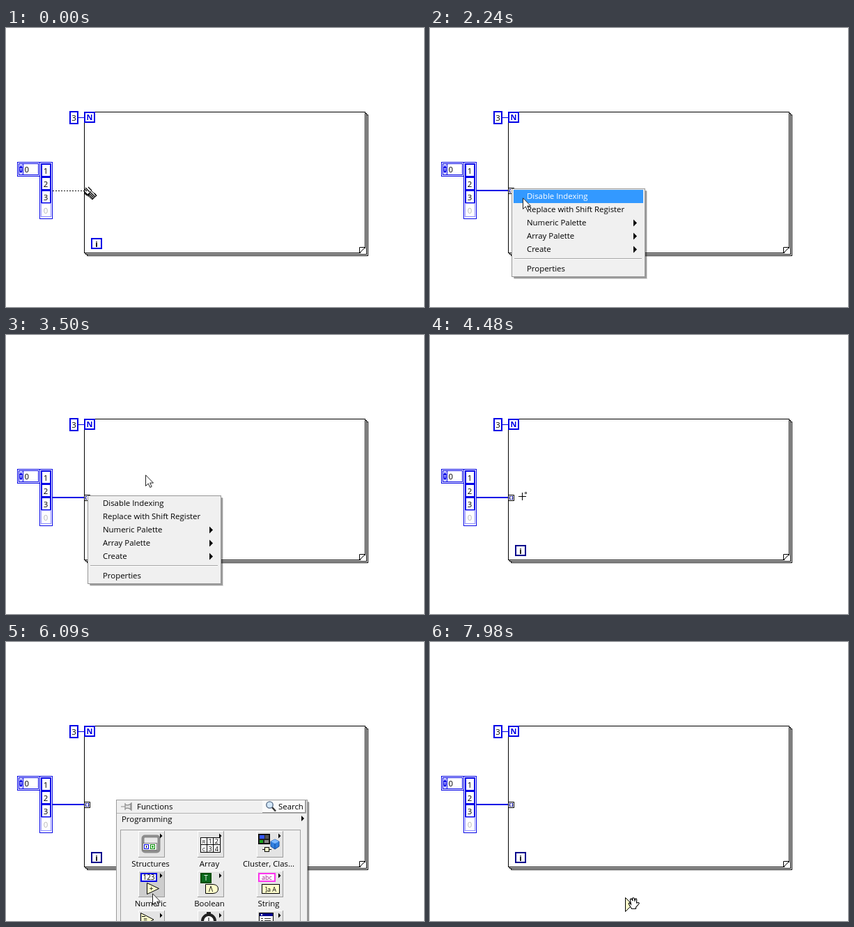
An HTML page that plays this animation: 600 by 400 pixels, repeating every 8000 ms.

```html
<!DOCTYPE html>
<html lang="en">
<head>
<meta charset="utf-8">
<title>Loop diagram</title>
<style>
  html, body { margin: 0; width: 100%; height: 100%; overflow: hidden; background: #fff; }
  svg { display: block; width: 600px; height: 400px; }
  text { font: 11.4px "Open Sans", "Noto Sans", sans-serif; white-space: pre; }
  .mid { text-anchor: middle; }
  .bold { font-weight: 700; }
  .crisp { shape-rendering: crispEdges; }
</style>
</head>
<body>
<svg id="stage" viewBox="0 0 600 400"></svg>
<script>
const LOOP = 8000, STEP = 70;
const BLUE = '#0000e6', NAVY = '#00008c', CREAM = '#ffffcc', FACE = '#f0f0f0';

// Markup helpers
const rect = (x, y, w, h, fill, more = '') =>
  `<rect class="crisp" x="${x}" y="${y}" width="${w}" height="${h}" fill="${fill}" ${more}/>`;
const box = (x, y, w, h, line, fill = 'none', lw = 1) =>
  rect(x + lw / 2, y + lw / 2, w - lw, h - lw, fill, `stroke="${line}" stroke-width="${lw}"`);
const path = (d, line = '#000', fill = 'none', lw = 1, more = '') =>
  `<path d="${d}" stroke="${line}" fill="${fill}" stroke-width="${lw}" ${more}/>`;
const crisp = (d, line, fill, lw) => path(d, line, fill, lw, 'class="crisp"');
const label = (x, y, s, more = '') => `<text x="${x}" y="${y}" ${more}>${s}</text>`;
const tiny = (x, y, s, size = 9, fill = '#000') =>
  `<text class="mid" x="${x}" y="${y}" fill="${fill}" style="font-size:${size}px">${s}</text>`;
const group = (id, body) => `<g id="${id}">${body}</g>`;
const triRight = (x, y, s) => path(`M${x} ${y - s}L${x + s} ${y}L${x} ${y + s}Z`, 'none', '#000');

function loopFrame() {
  return box(112, 120, 404, 203, '#000', '#fff')
    + crisp('M516 122.5H517.5V324.5H114.5V323M518 124.5H519.5V326.5H116.5V325')
    + path('M508 323.5H516.5V315Z', 'none', '#fff')
    + path('M507.5 322.5V314.5H515.5Z', '#000', '#fff')
    + box(91, 119, 13, 19, BLUE, '#fff', 2)
    + label(97.5, 133, '3', 'class="mid"')
    + rect(104, 128, 8, 1, BLUE)
    + box(112, 120, 16, 16, BLUE, '#fff', 2)
    + `<text class="mid bold" x="120" y="132" fill="${BLUE}" style="font-size:11px">N</text>`
    + rect(123, 302, 14, 14, '#fff', `id="count" stroke="${BLUE}" stroke-width="2"`)
    + label(130, 314, 'i', 'class="mid bold"');
}

function arrayConstant() {
  let s = box(16, 192, 33, 21, BLUE, '#fff') + box(18, 194, 29, 17, BLUE)
    + rect(19, 195, 6, 15, '#d8d8ff') + box(24, 194, 23, 17, BLUE, '#fff')
    + path('M19 201L21.5 196.500L24 201ZM19 204H24L21.5 208.500Z', 'none', BLUE)
    + rect(19, 202, 5, 1, BLUE)
    + label(26.5, 207, '0')
    + box(48, 192, 19, 82, BLUE, '#fff');
  ['1', '2', '3', '0'].forEach((n, i) => {
    const y = 195 + i * 19, off = i === 3;
    s += box(50, y - 1, 15, 20, off ? '#8c8cff' : BLUE, '#fff', off ? 1 : 2)
      + label(57, y + 14, n, `class="mid" fill="${off ? '#b8b8b8' : '#000'}"`);
  });
  return s;
}

const wires = () =>
  group('draft', path('M67 233.5H114', '#000', 'none', 1, 'class="crisp" stroke-dasharray="2 2"'))
  + group('wire', rect(67, 232, 45, 2, BLUE) + box(112, 229, 9, 9, '#000', '#fff')
    + crisp('M116 231.5H114.5V235.5H116M117 231.5H118.5V235.5H117', NAVY));

function contextMenu() {
  const items = ['Disable Indexing', 'Replace with Shift Register', 'Numeric Palette', 'Array Palette', 'Create'];
  return rect(121, 234, 191, 126, '#000', 'opacity=".13"')
    + rect(120, 233, 191, 126, '#000', 'opacity=".3"')
    + box(117, 230, 192, 127, '#979797', FACE)
    + rect(120, 232, 186, 19, '#3399ff', 'id="pick"')
    + items.map((s, i) => label(139, 245 + i * 19, s, i ? '' : 'id="first"')
      + (i > 1 ? triRight(292, 241.5 + i * 19, 5) : '')).join('')
    + rect(121, 330, 183, 1, '#a6a6a6') + rect(121, 331, 183, 1, '#fff')
    + label(139, 349, 'Properties');
}

// Palette parts
const pin = (x, y) =>
  path(`M${x} ${y + 6}H${x + 6}M${x + 6} ${y + 1}V${y + 11}M${x + 6} ${y + 3}Q${x + 10} ${y + 5} ${x + 14} ${y + 2}V${y + 10}Q${x + 10} ${y + 7} ${x + 6} ${y + 9}M${x + 15} ${y}V${y + 12}`,
    '#8a8a8a', '#e2e2e2', 1.2);

const tile = (x, y, art, id = '') =>
  rect(x, y, 38, 38, '#e4e4e4', id && `id="${id}"`)
  + crisp(`M${x + .5} ${y + 38}V${y + .5}H${x + 38}`, '#fff')
  + crisp(`M${x} ${y + 37.5}H${x + 37.5}V${y}`, '#9a9a9a')
  + `<g transform="translate(${x} ${y})">${art}</g>`;

const node = (x, y, w, h, sign) =>
  path(`M${x} ${y}L${x + w} ${y + h / 2}L${x} ${y + h}Z`, '#000', CREAM)
  + tiny(x + w * .36, y + h / 2 + 3.5, sign, 10);

const art = {
  structures: `<rect x="6.500" y="7.500" width="23" height="22" rx="3" fill="#e8e8e8" stroke="#8c8c8c" stroke-width="4"/>`
    + box(6, 17, 21, 11, '#777', '#fff') + box(8, 19, 7, 7, BLUE, '#fff') + rect(11, 21, 1, 3, '#000')
    + box(17, 19, 7, 7, '#008000', '#fff') + `<circle cx="20.500" cy="22.500" r="1.500" fill="#0a0"/>`,
  array: box(4, 9, 29, 22, '#000', '#fff') + crisp('M13.5 9V31M22.5 9V31M4 19.5H33')
    + ['R', '1', '2', 'C', '3', '4'].map((c, i) =>
      tiny(9 + i % 3 * 9.2, 18 + (i > 2) * 10.5, c, i % 3 ? 9 : 7)).join(''),
  cluster: box(2, 4, 17, 15, '#000', '#222') + rect(4, 6, 7, 5, '#3355ff') + rect(4, 13, 5, 4, '#19a319')
    + rect(12, 6, 5, 5, '#555') + rect(11, 13, 6, 4, '#888')
    + path('M20 15L26 12L32 15V22L26 26L20 22Z', '#124a9c', '#2f7fe0')
    + path('M20 15L26 18L32 15L26 12Z', 'none', '#7db8ff') + path('M26 18V26', '#124a9c')
    + path('M8 26.5H11M18 26.500H21', '#000') + box(11, 23, 7, 7, '#000', CREAM),
  numeric: box(3, 3, 24, 13, BLUE, '#fff', 2) + tiny(15, 13, '123', 10) + node(12.5, 17.5, 17, 16, '+'),
  boolean: box(4, 3, 16, 15, '#004d00', '#0a6b1e', 2) + tiny(12, 14, 'T', 10, '#fff')
    + path('M11.5 19.5H22Q29.500 20 29.500 26Q29.500 32 22 32.500H11.500Z', '#000', CREAM)
    + tiny(19, 30, 'Λ', 10),
  string: box(2, 3, 25, 13, '#ff33ee', '#fff', 2) + tiny(14.5, 12.5, 'abc', 9, '#a0148c')
    + box(7, 19, 26, 14, '#000', CREAM) + tiny(20, 30, ']a A', 9),
  compare: path('M3.5 3.500L22 13L3.500 23Z', '#000', CREAM) + tiny(10, 16, '=', 10)
    + crisp('M5 8.5H10', '#000'),
  timing: `<circle cx="16" cy="15" r="9" fill="#fff" stroke="#222" stroke-width="4"/>`
    + rect(13, 2, 6, 4, '#222') + path('M16 10V16L20 18'),
  dialog: box(3, 3, 21, 18, '#000', '#fff') + rect(4, 4, 19, 4, NAVY) + rect(6, 5, 2, 2, '#fff')
    + crisp('M6 11.5H9M11 11.5H20M6 14.5H9M11 14.5H20', '#333')
};

function functionsPalette() {
  const cells = [
    ['structures', 'Structures'], ['array', 'Array'], ['cluster', 'Cluster, Clas...'],
    ['numeric', 'Numeric'], ['boolean', 'Boolean'], ['string', 'String'],
    ['compare'], ['timing'], ['dialog']];
  let s = rect(162, 230, 274, 170, '#000', 'opacity=".1"') + rect(161, 229, 274, 171, '#000', 'opacity=".35"')
    + box(158, 226, 275, 180, '#9a9a9a', FACE) + rect(159, 245, 272, 1, '#b4b4b4')
    + pin(165, 230) + label(188, 240, 'Functions')
    + rect(368, 227, 63, 17, '#fafafa') + rect(368, 244, 63, 1, '#8f8f8f') + rect(429, 227, 2, 18, '#a0a0a0')
    + path('M382 237L387 242.5', '#333', 'none', 2.4)
    + `<circle cx="378.500" cy="233.500" r="4.700" fill="#d4e8fa" stroke="#4f6580" stroke-width="1.300"/>`
    + label(391, 240, 'Search')
    + label(166, 258, 'Programming') + triRight(424, 253, 4)
    + box(164, 269, 259, 140, '#a0a0a0', FACE);
  cells.forEach(([key, name], i) => {
    const col = i % 3, x = [190, 275, 360][col], y = 271 + 57 * Math.floor(i / 3);
    s += tile(x, y, art[key] + triRight(31, 7, 3.5), key === 'numeric' ? 'hot' : '');
    if (name) s += label([207.500, 292, 377][col], y + 51, name, 'class="mid"');
  });
  return s;
}

function numericPalette() {
  return box(246, 346, 526, 90, '#9a9a9a', FACE) + rect(247, 365, 524, 1, '#b4b4b4')
    + pin(253, 350) + label(276, 360, 'Numeric')
    + box(252, 369, 514, 80, '#a0a0a0', FACE)
    + ['+', '−', '×', '÷'].map((sign, i) =>
      tile(278 + 85 * i, 371, node(9.5, 7.5, 21, 23, sign), i ? '' : 'add')).join('');
}

function pointers() {
  const spool = path('M1 3L4 6M2 1L8 7M6 0L11 5M0 6L6 12M1 9L4 12', '#000', 'none', 1.2)
    + path('M4.5 11.500L10.500 5.500L18 12L12 18Z', '#000', '#fff')
    + path('M6 10.5L13 17M7.5 9L14.5 15.500M9 7.5L16 14M5 13L8 9M15 9L18 13', '#000', 'none', 1.3);
  const cross = rect(-5, 0, 11, 1, '#000') + rect(0, -5, 1, 11, '#000') + box(4, -6, 3, 3, '#555');
  const arrow = path('M.5 .8V16.500L4.2 13L6.800 18.500L9.200 17.400L6.700 12.100H11.500Z', '#222', '#fff');
  const hand = path('M7.5 4.5Q7 2 9 2L11 5L10.500 1.500Q12 0 13.200 1.500L14 5L15 2Q16.500 1.500 16.700 3.500L16.500 8L19 7.500Q21 8 19.800 9.500L15.500 14.500V16.500H9.500L5.500 10Q4.500 8 6.500 8L8.500 10Z',
    '#000', '#fff', 1.1);
  return group('spool', spool) + group('cross', cross) + group('arrow', arrow)
    + group('hand', group('carried', path('M.5 .5L10.500 10.500L.5 20.500Z', '#000', CREAM)) + hand);
}

const $ = id => document.getElementById(id);
$('stage').innerHTML = rect(0, 0, 600, 400, '#fff') + loopFrame() + arrayConstant() + wires()
  + group('menu', contextMenu()) + group('palette', functionsPalette())
  + group('sub', numericPalette()) + pointers();

// Pointer route: time, x, y
const route = [
  [0, 112, 228], [140, 112, 228], [210, 113, 229], [280, 121, 238], [490, 121, 238],
  [560, 113, 232], [700, 115, 231], [770, 115, 231], [910, 116, 231], [1120, 116, 231],
  [1190, 118, 232], [1610, 118, 232], [1960, 132, 244], [2170, 132, 244], [2240, 133, 243],
  [2380, 128, 238], [2520, 132, 237], [2940, 184, 250], [3010, 185, 249], [3080, 185, 247],
  [3290, 185, 247], [3500, 200, 200], [3990, 200, 200], [4480, 132, 231], [4620, 118, 239],
  [4830, 118, 239], [5040, 158, 228], [5320, 158, 228], [6090, 210, 360], [6860, 210, 360],
  [7140, 290, 372], [7770, 290, 372], [7840, 280, 366], [LOOP, 280, 366]];

function pointAt(t) {
  const i = route.findIndex(k => k[0] > t);
  const [t0, x0, y0] = route[i - 1], [t1, x1, y1] = route[i];
  const p = (t - t0) / (t1 - t0);
  return [Math.round(x0 + (x1 - x0) * p), Math.round(y0 + (y1 - y0) * p)];
}

const pointerAt = t =>
  t < 280 ? 'spool' : t < 560 ? 'cross' : t < 3920 ? 'arrow' : t < 5110 ? 'cross' : t < 7840 ? 'arrow' : 'hand';
const show = (id, on) => $(id).setAttribute('display', on ? 'inline' : 'none');
const within = (t, a, b) => t >= a && t < b;

// Popups appear in three steps
function popup(id, t, start, end) {
  show(id, within(t, start, end));
  $(id).setAttribute('opacity', t < start + STEP ? .3 : t < start + 2 * STEP ? .65 : 1);
}

function draw(ms) {
  const t = Math.floor(ms / STEP) * STEP;
  const [x, y] = pointAt(t);
  show('draft', t < 70);
  show('wire', t >= 70);
  $('count').setAttribute('stroke', t < 3920 ? BLUE : NAVY);

  popup('menu', t, 1190, 3920);
  const picked = within(t, 1680, 3430);
  show('pick', picked);
  $('first').setAttribute('fill', picked ? '#fff' : '#000');

  popup('palette', t, 5110, 7840);
  show('sub', within(t, 6510, 7840));
  $('hot').setAttribute('fill', y >= 328 && x >= 190 ? '#cdcdcd' : '#e4e4e4');
  $('add').setAttribute('fill', x >= 278 ? '#cdcdcd' : '#e4e4e4');

  const active = pointerAt(t);
  for (const id of ['spool', 'cross', 'arrow', 'hand']) show(id, id === active);
  $(active).setAttribute('transform', `translate(${x} ${y})`);
  show('carried', t >= 7980);
}

const begin = performance.now();
function tick() {
  draw((performance.now() - begin) % LOOP);
  requestAnimationFrame(tick);
}
tick();
</script>
</body>
</html>
```
